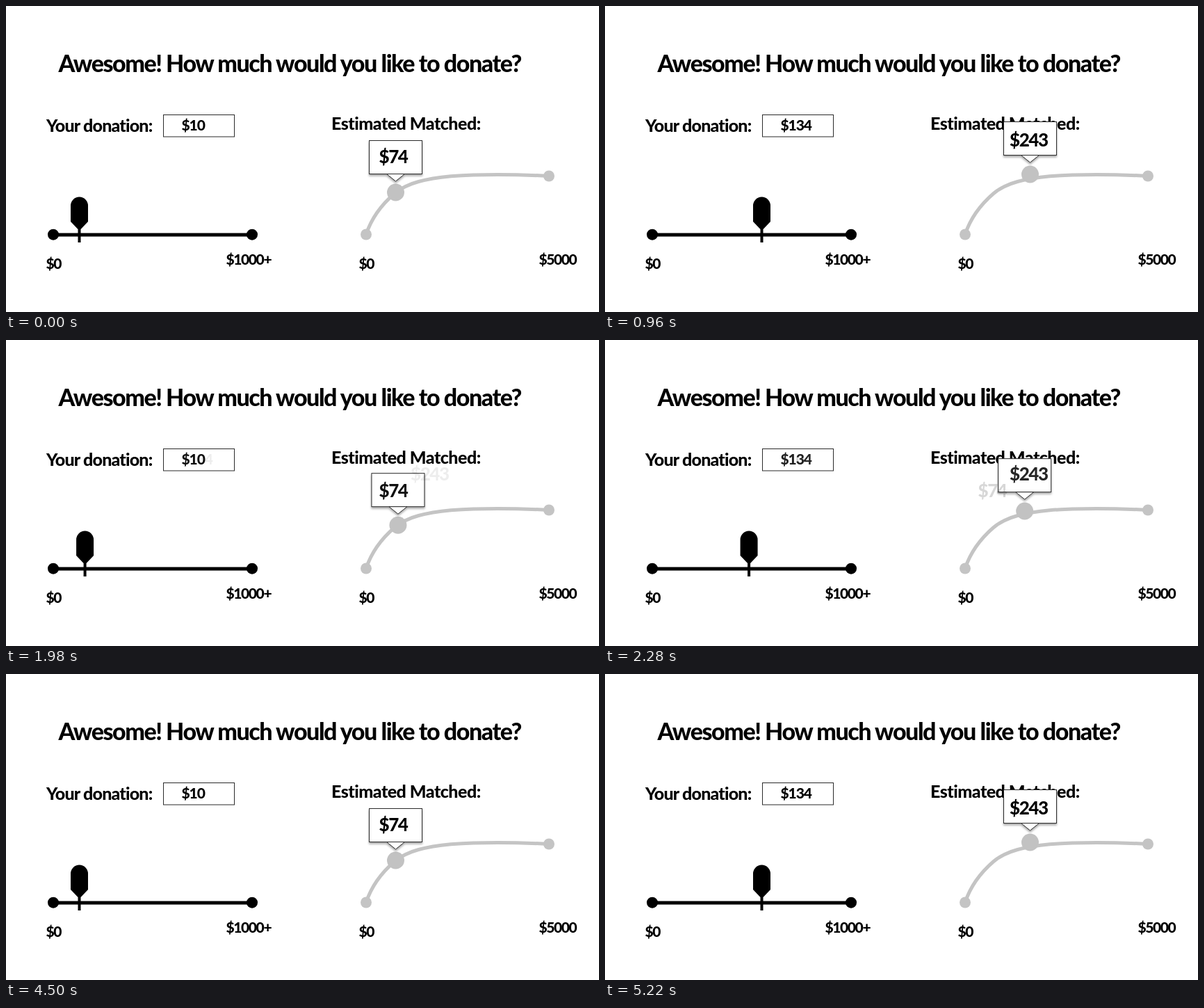
An HTML page for the animation above (5250 ms loop, 853 by 440 pixels).

```html
<!DOCTYPE html>
<html lang="en">
<head>
<meta charset="utf-8">
<title>Donation slider</title>
<style>
  html, body { margin: 0; width: 100%; height: 100%; overflow: hidden; background: #fff; }
  svg { display: block; width: 100%; height: 100%; }
  text { font-family: Lato, "Open Sans", sans-serif; font-weight: 800; fill: #000; }
  .title { font-size: 34px; letter-spacing: -1.45px; }
  .label { font-size: 25px; letter-spacing: -0.8px; }
  .heading { font-size: 25px; letter-spacing: -0.5px; }
  .limit { font-size: 21px; letter-spacing: -1.4px; }
  .amount { font-size: 21px; letter-spacing: -1.1px; }
  .match { font-size: 26px; letter-spacing: -1.4px; }
  .box { fill: #fff; stroke: #2a2a2a; stroke-width: 1; }
</style>
</head>
<body>
<svg viewBox="0 0 853 440">
  <defs>
    <filter id="shadow" x="-10%" y="-10%" width="120%" height="130%">
      <feDropShadow dx="0" dy="2.5" stdDeviation="1.5" flood-color="#000" flood-opacity="0.35"/>
    </filter>
  </defs>

  <text class="title" x="75.5" y="94.5">Awesome! How much would you like to donate?</text>

  <text class="label" x="58" y="181">Your donation:</text>
  <rect class="box" x="226.5" y="156.5" width="102" height="31.5"/>
  <text class="amount low" x="252.5" y="179">$10</text>
  <text class="amount high" x="252.5" y="179">$134</text>

  <path d="M68 329H354" stroke="#000" stroke-width="5"/>
  <circle cx="68" cy="328.7" r="8"/>
  <circle cx="354" cy="328.7" r="8"/>
  <g id="knob">
    <path d="M-12.5 310V287A12.5 12.5 0 0 1 12.5 287V310L2 321V340H-2V321Z"/>
  </g>
  <text class="limit" x="57.5" y="378">$0</text>
  <text class="limit" x="316.5" y="372">$1000+</text>

  <text class="heading" x="468" y="178">Estimated Matched:</text>
  <g fill="#c4c4c4">
    <path d="M518 328.5C526 304 541 285 559 269.5C577 254 606 248 640 244.7C690 241 740 242.3 781 244.5"
          fill="none" stroke="#c4c4c4" stroke-width="5"/>
    <circle cx="518" cy="328.5" r="8"/>
    <circle cx="781" cy="244.5" r="8"/>
  </g>
  <circle id="marker" r="12.5" fill="#c2c2c2"/>
  <g id="bubble">
    <g filter="url(#shadow)">
      <rect class="box" x="-38" y="0" width="76" height="48"/>
      <path class="box" d="M-13 48L0 58.5L13 48Z"/>
    </g>
  </g>
  <text class="match low" x="536.5" y="226">$74</text>
  <text class="match high" x="582" y="202">$243</text>
  <text class="limit" x="507.5" y="378">$0</text>
  <text class="limit" x="766.5" y="372">$5000</text>
</svg>
<script>
  const LOOP = 5250, STEP = 30;

  // Each move: start ms, end ms, slider level reached.
  const moves = [
    [0, 475, 1],
    [1005, 1485, 0],
    [1900, 2405, 1],
    [3660, 4060, 0],
    [4770, 5220, 1]
  ];

  const find = id => document.getElementById(id);
  const knob = find("knob"), marker = find("marker"), bubble = find("bubble");
  const lows = document.querySelectorAll(".low");
  const highs = document.querySelectorAll(".high");

  const mix = (a, b, k) => a + (b - a) * k;
  const ease = u => u * u * (3 - 2 * u);
  const place = (el, x, y) => el.setAttribute("transform", `translate(${x} ${y})`);
  const fade = (list, k) => list.forEach(el => el.setAttribute("opacity", k));

  function levelAt(ms) {
    let level = 0;
    for (const [start, end, goal] of moves) {
      if (ms < start) break;
      const u = Math.min(1, (ms - start) / (end - start));
      level = mix(level, goal, ease(u));
    }
    return level;
  }

  function draw(ms) {
    const k = levelAt(ms);
    const x = mix(560.5, 611.5, k);
    place(knob, mix(105.5, 225.5, k), 0);
    place(marker, x, mix(268, 242, k));
    place(bubble, x, mix(193.5, 166.5, k));
    fade(lows, 1 - k);
    fade(highs, k);
  }

  const origin = performance.now();
  function tick() {
    const ms = (performance.now() - origin) % LOOP;
    draw(Math.floor(ms / STEP) * STEP);
    requestAnimationFrame(tick);
  }
  draw(0);
  requestAnimationFrame(tick);
</script>
</body>
</html>
```
